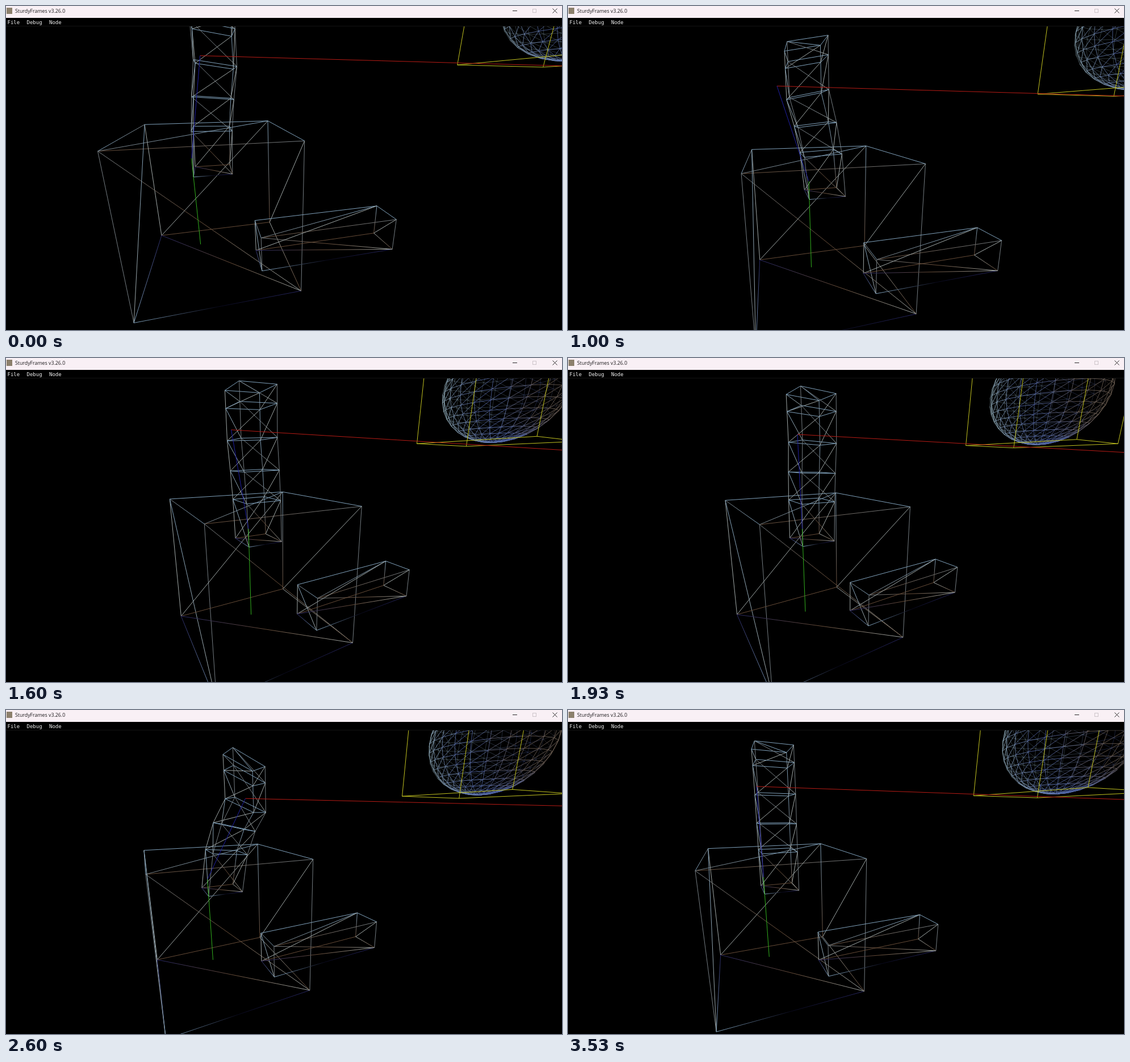
Animation, 979 px wide and 572 px high, one loop 3590 ms. Source, as an HTML page with a canvas:

```html
<!DOCTYPE html>
<html lang="en">
<head>
<meta charset="utf-8">
<title>Wireframe viewer</title>
<style>
html, body { margin: 0; width: 100%; height: 100%; overflow: hidden; background: #000; }
canvas { display: block; }
</style>
</head>
<body>
<canvas id="stage" width="979" height="572"></canvas>
<script>
const W = 979, H = 572, LOOP = 3590, FPS = 15, VIEW_TOP = 35;
const FOCAL = 480, CENTER_X = 490, CENTER_Y = 296.5;
const ctx = document.getElementById('stage').getContext('2d');

// Camera pitch and heading in degrees, its position (y points down), tower sway.
const KEYS = [
  { frame: 0, v: [17.47, 75.1, .024, -1.551, -3.805, .13] },
  { frame: 7, v: [11.7, 81.8, .076, -1.478, -3.562, -.13] },
  { frame: 15, v: [12.05, 74, -.737, -1.543, -3.735, -.21] },
  { frame: 20, v: [13.19, 62, -1.525, -1.531, -3.406, -.13] },
  { frame: 29, v: [13.3, 57.9, -1.653, -1.592, -3.614, .05] },
  { frame: 39, v: [13.58, 63, -.971, -1.61, -4.023, .42] },
  { frame: 49, v: [13.36, 67.2, -.626, -1.584, -4.177, .01] }
];

const slope = (i, n) =>
  (KEYS[i + 1].v[n] - KEYS[i].v[n]) / (KEYS[i + 1].frame - KEYS[i].frame);

// Monotone tangent, so that nothing overshoots its keyed place.
function tangent(i, n) {
  if (i === 0) return slope(0, n);
  if (i === KEYS.length - 1) return 0;
  const a = slope(i - 1, n), b = slope(i, n);
  return a * b > 0 ? 2 * a * b / (a + b) : 0;
}

function stateAt(frame) {
  let i = 0;
  while (i < KEYS.length - 2 && KEYS[i + 1].frame <= frame) i++;
  const a = KEYS[i], b = KEYS[i + 1], span = b.frame - a.frame;
  const u = Math.min(1, (frame - a.frame) / span), r = 1 - u;
  return a.v.map((p, n) =>
    p * (1 + 2 * u) * r * r + b.v[n] * u * u * (3 - 2 * u) +
    span * u * r * (tangent(i, n) * r - tangent(i + 1, n) * u));
}

function makeCamera([pitch, heading, camX, camY, camZ]) {
  const rad = Math.PI / 180;
  const sp = Math.sin(pitch * rad), cp = Math.cos(pitch * rad);
  const sh = Math.sin(heading * rad), ch = Math.cos(heading * rad);
  return ([px, py, pz]) => {
    const x = px - camX, y = py - camY, z = pz - camZ;
    const ahead = x * ch + z * sh, depth = y * sp + ahead * cp;
    return [CENTER_X + FOCAL * (x * sh - z * ch) / depth,
            CENTER_Y + FOCAL * (y * cp - ahead * sp) / depth];
  };
}

// Corners run front-left, front-right, back-right, back-left.
const CORNERS = [[-1, -1], [1, -1], [1, 1], [-1, 1]];

function box(cx, cy, cz, hx, hy, hz) {
  return [-1, 1].flatMap(up =>
    CORNERS.map(([sx, sz]) => [cx + sx * hx, cy + up * hy, cz + sz * hz]));
}

const CUBE = box(0, 0, 0, 1, 1, 1);
const BAR = box(1.53, .53, -.5, 1, .25, .25);
const BALL_AT = [6.05, -3.17, -.2], RADIUS = 1.17;
const CAGE = box(...BALL_AT, RADIUS, RADIUS, RADIUS);

// Corner pair followed by the colour stops along the edge.
const EDGES = ('01ng 12bb 23bb 30gb 02gb 04gg 15gg 26bn 37ww 05gnw 27ww 34bw 16ww ' +
  '45bkd 56nw 67nn 74db 75dnw').split(' ');
const TINT = { w: '#9ea6a5', b: '#7fa0ba', g: '#737b80', n: '#644a36', d: '#262660', k: '#08081a' };

function line([x1, y1], [x2, y2], style) {
  ctx.strokeStyle = style;
  ctx.beginPath();
  ctx.moveTo(x1, y1);
  ctx.lineTo(x2, y2);
  ctx.stroke();
}

function drawEdge(p, edge, stops) {
  const a = p[edge[0]], b = p[edge[1]];
  const grad = ctx.createLinearGradient(...a, ...b);
  [...stops].forEach((c, i) => grad.addColorStop(i / (stops.length - 1), TINT[c]));
  line(a, b, grad);
}

function drawBox(project, corners) {
  const p = corners.map(project);
  for (const e of EDGES) drawEdge(p, e, e.slice(2));
}

const LEVELS = [2.03, 1.81, 1.4, .99, .585, 0], TOWER_BASE = -.45, TOWER_HALF = .25;

// A ring leans and tilts with the sway, more so higher up.
function towerRing(level, sway) {
  const bend = sway * Math.min(1, Math.pow(level / 1.4, 1.7));
  const y = TOWER_BASE - level + .8 * bend * bend;
  return CORNERS.map(([sx, sz]) => [
    bend + sx * TOWER_HALF * Math.cos(bend),
    y + sx * TOWER_HALF * Math.sin(bend),
    sz * TOWER_HALF
  ]);
}

function drawTower(project, sway) {
  const rings = LEVELS.map(l => towerRing(l, sway).map(project));
  for (let seg = 0; seg < 5; seg++) {
    const p = [...rings[seg], ...rings[seg + 1]], last = seg === 4;
    for (const e of EDGES) {
      const lower = e[0] >= 4, upper = e[1] < 4;
      if (lower && !last || e.startsWith('02') && seg) continue;
      let stops = upper ? 'bb' : e.slice(2);
      if (!last) stops = stops.replace(/n/g, 'g');
      drawEdge(p, e, stops);
    }
  }
}

const RINGS = 18, SECTORS = 24;

function ballNode(i, j) {
  const lat = Math.PI * i / RINGS, lon = 2 * Math.PI * j / SECTORS;
  return [Math.sin(lat) * Math.cos(lon), Math.cos(lat), Math.sin(lat) * Math.sin(lon)];
}

function ballColour(z, front) {
  const light = [150, 178, 192], blue = [84, 104, 168], brown = [116, 100, 88];
  const u = Math.min(1, Math.max(0, (.7 - z) / .8)), w = Math.min(1, Math.max(0, (-.3 - z) / .5));
  const rgb = light.map((c, i) => {
    const mid = c + (blue[i] - c) * u;
    return Math.round(mid + (brown[i] - mid) * w);
  });
  return `rgba(${rgb},${front ? .8 : .3})`;
}

const ballEdges = [];
for (let i = 0; i < RINGS; i++)
  for (let j = 0; j < SECTORS; j++)
    for (const [di, dj] of [[0, 1], [1, 0], [1, 1]])
      ballEdges.push([ballNode(i, j), ballNode(i + di, j + dj)]);

function drawBall(project, eye) {
  const place = n => project(n.map((c, k) => BALL_AT[k] + RADIUS * c));
  const toEye = eye.map((c, k) => c - BALL_AT[k]);
  for (const [a, b] of ballEdges) {
    const facing = a.reduce((sum, c, k) => sum + c * toEye[k], 0) > RADIUS;
    line(place(a), place(b), ballColour((a[2] + b[2]) / 2, facing));
  }
}

function drawCage(project) {
  const p = CAGE.map(project);
  for (let i = 0; i < 4; i++) {
    const next = (i + 1) % 4;
    line(p[i], p[next], '#c2c220');
    line(p[i + 4], p[next + 4], '#c2c220');
    line(p[i], p[i + 4], '#c2c220');
  }
}

function drawAxes(project, sway) {
  const y = -1.95 + .8 * sway * sway, x = -.25 + 1.6 * sway;
  const tip = project([x, y, -.02]), joint = project([-.25, -.7, -.25]);
  line(tip, project([x + 20, y, -.02]), '#b81c16');
  line(tip, joint, '#2020a4');
  line(joint, project([-.25, .55, -.25]), '#32b01e');
}

function drawChrome() {
  ctx.fillStyle = '#f9f0f5';
  ctx.fillRect(0, 0, W, 21);
  ctx.fillStyle = '#8c806c';
  ctx.fillRect(1, 3, 10, 11);
  ctx.fillStyle = '#1c1a1c';
  ctx.font = '8.8px "Open Sans", sans-serif';
  ctx.fillText('SturdyFrames v3.26.0', 16, 12);
  line([892, 8.5], [900, 8.5], '#2a282a');
  ctx.strokeStyle = '#cdc5ca';
  ctx.strokeRect(927.5, 5.5, 6, 6);
  line([962.5, 4.5], [970.5, 12.5], '#2a282a');
  line([970.5, 4.5], [962.5, 12.5], '#2a282a');
  ctx.fillStyle = '#f2f2f2';
  ctx.font = '9px "DejaVu Sans Mono", monospace';
  ctx.fillText('File', 2.5, 32);
  ctx.fillText('Debug', 36.5, 32);
  ctx.fillText('Node', 76, 32);
  line([0, 35.5], [W, 35.5], '#141414');
}

function render(now) {
  const state = stateAt(Math.floor((now % LOOP + 4) * FPS / 1000));
  const project = makeCamera(state), sway = state[5];
  ctx.fillStyle = '#000';
  ctx.fillRect(0, 0, W, H);
  ctx.lineWidth = 1;
  ctx.save();
  ctx.beginPath();
  ctx.rect(0, VIEW_TOP + 1, W, H);
  ctx.clip();
  drawBall(project, state.slice(2, 5));
  drawBox(project, CUBE);
  drawBox(project, BAR);
  drawTower(project, sway);
  drawCage(project);
  drawAxes(project, sway);
  ctx.restore();
  drawChrome();
}

const start = performance.now();
function tick() {
  render(performance.now() - start);
  requestAnimationFrame(tick);
}
tick();
</script>
</body>
</html>
```
